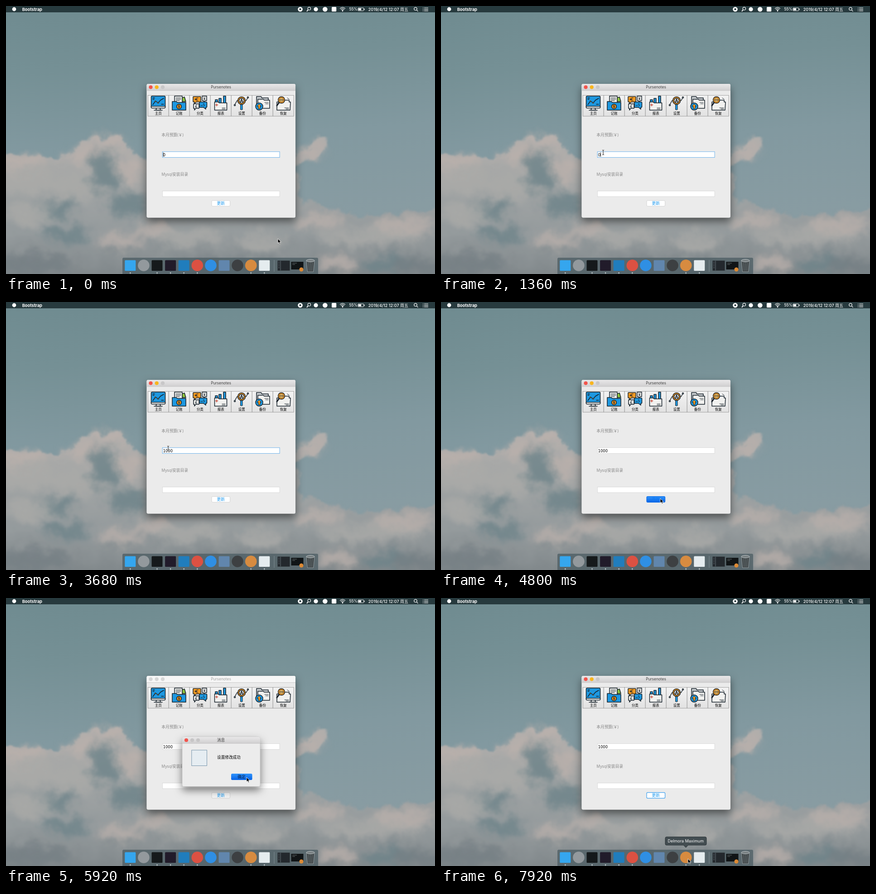
An HTML page that plays this animation: 947x592 px, repeating every 8000 ms.

```html
<!DOCTYPE html>
<html lang="zh">
<head>
<meta charset="utf-8">
<title>Pursenotes</title>
<style>
html, body { margin: 0; width: 100%; height: 100%; overflow: hidden; background: #7b9498; }
svg { position: absolute; left: 0; top: 0; width: 947px; height: 592px; }
text { font-family: Inter, "Noto Sans CJK SC", "Noto Sans CJK", sans-serif; }
.field { font: 8.3px "DejaVu Sans", sans-serif; }
.form { font: 8.7px "Open Sans", "Noto Sans CJK SC", "Noto Sans CJK", sans-serif; fill: #858585; }
.mid { text-anchor: middle; }
.ico { stroke: #17222b; stroke-width: 1.5; stroke-linejoin: round; stroke-linecap: round; fill: none; }
.b { fill: #1e98e0; } .o { fill: #f99c22; } .w { fill: #f1f1ef; } .g { fill: #c9cdd0; }
</style>
</head>
<body>
<svg id="sky" viewBox="0 0 947 592">
  <defs>
    <linearGradient id="air" x1="0" y1="0" x2=".12" y2="1">
      <stop offset="0" stop-color="#6f8b90"/><stop offset=".25" stop-color="#759095"/>
      <stop offset=".55" stop-color="#8299a0"/><stop offset="1" stop-color="#8b9da3"/>
    </linearGradient>
    <linearGradient id="bank" x1="0" y1="285" x2="0" y2="592" gradientUnits="userSpaceOnUse">
      <stop offset="0" stop-color="#b4b0ad"/><stop offset=".35" stop-color="#a2a5a5"/>
      <stop offset=".7" stop-color="#959b9d"/><stop offset="1" stop-color="#82898c"/>
    </linearGradient>
    <filter id="billow" x="-60" y="200" width="1070" height="460" filterUnits="userSpaceOnUse" color-interpolation-filters="sRGB">
      <feTurbulence type="fractalNoise" baseFrequency=".024" numOctaves="5" seed="4" result="n"/>
      <feDisplacementMap in="SourceGraphic" in2="n" scale="46" xChannelSelector="R" yChannelSelector="G"/>
      <feGaussianBlur stdDeviation=".8"/>
    </filter>
    <filter id="soft" x="-60" y="200" width="1070" height="460" filterUnits="userSpaceOnUse" color-interpolation-filters="sRGB"><feGaussianBlur stdDeviation="9"/></filter>
    <filter id="edge" x="-60" y="200" width="1070" height="460" filterUnits="userSpaceOnUse"><feGaussianBlur stdDeviation="2.5"/></filter>
  </defs>
  <rect width="947" height="592" fill="url(#air)"/>
  <g filter="url(#billow)">
    <path filter="url(#edge)" fill="url(#bank)" d="M-50 322C0 318 20 322 45 330C70 345 90 325 118 332C135 330 150 305 180 305C195 300 215 284 240 283C262 284 270 300 275 320C290 322 300 340 325 345L620 345C650 335 680 295 708 290C712 310 695 330 676 336C665 345 655 350 640 352L650 425C700 440 730 462 770 462C820 470 850 450 880 458C910 462 940 438 1000 440V640H-50Z"/>
    <g id="puffs" filter="url(#soft)"></g>
  </g>
</svg>

<svg id="ui" viewBox="0 0 947 592">
  <defs>
    <linearGradient id="bar" x2="0" y2="1"><stop stop-color="#e9e8e9"/><stop offset="1" stop-color="#d0cfd0"/></linearGradient>
    <linearGradient id="key" x2="0" y2="1"><stop stop-color="#f3f3f3"/><stop offset="1" stop-color="#e2e2e2"/></linearGradient>
    <linearGradient id="blue" x2="0" y2="1"><stop stop-color="#2f93fb"/><stop offset="1" stop-color="#0763e6"/></linearGradient>
    <filter id="shade" x="-20%" y="-20%" width="140%" height="150%"><feDropShadow dx="0" dy="8" stdDeviation="9" flood-opacity=".5"/></filter>
  </defs>

  <g id="menubar">
    <rect width="947" height="14" fill="#273a3e"/>
    <g fill="#fff">
      <circle cx="18" cy="7" r="4.4"/>
      <text x="35.7" y="10.5" font-size="9.25" font-weight="700">Bootstrap</text>
      <circle cx="649.5" cy="7.2" r="5.3"/><rect x="647.6" y="5.3" width="3.8" height="3.8" rx=".6" fill="#273a3e"/>
      <circle cx="684" cy="7.2" r="4.6"/>
      <circle cx="704.3" cy="7.2" r="5.3"/>
      <rect x="719" y="2" width="10.2" height="10.2" rx="1.5"/>
      <text x="757.4" y="10.2" font-size="8.3" font-weight="500">55%</text>
      <rect x="778" y="5.2" width="6" height="4.2"/><rect x="790.3" y="5.8" width="1.3" height="3"/>
      <text x="799.8" y="10.5" font-size="9" font-weight="500">2019/4/12 12:07 周五</text>
      <circle cx="743" cy="11" r="1.2"/>
    </g>
    <g fill="none" stroke="#fff" stroke-width="1.2">
      <circle cx="669.3" cy="5.8" r="3.2"/><path d="M667 8.2l-3 3.6" stroke-width="1.8"/>
      <path d="M737 5.6q6-5 12 0M739 7.7q4-3.2 8 0M741 9.6q2-1.4 4 0"/>
      <rect x="777" y="4" width="12.6" height="6.6" rx="1" stroke-width=".9"/>
      <circle cx="904" cy="6.3" r="3.2"/><path d="M906.4 8.7l3 3.2"/>
      <path d="M923 4h9M923 7.3h9M923 10.6h9M920 4h1.4M920 7.3h1.4M920 10.6h1.4"/>
    </g>
  </g>

  <g id="main">
    <rect x="310.5" y="172" width="328.5" height="295.5" rx="3.5" fill="#ebebeb" filter="url(#shade)"/>
    <path id="cap" d="M310.5 186.5V175.5q0-3.5 3.5-3.5H635.5q3.5 0 3.5 3.5V186.5Z" fill="url(#bar)"/>
    <path d="M310.5 186.8H639" stroke="#b9b9b9" stroke-width=".7"/>
    <g id="lights"></g>
    <text id="title" class="mid" x="474.5" y="182.2" font-size="8.4">Pursenotes</text>
    <g id="tools"></g>
    <g class="ico">
      <g id="monitor"><rect class="b" x="320.5" y="199" width="31" height="26" rx="2"/><path class="w" d="M320.5 221.5h31v2q0 2-2 2h-27q-2 0-2-2ZM332 225.5h8l1 4.5h-10Z"/><path d="M327 230.3h18M324 218l6-8 6 4 5-6 7-4M324 203h4M324 206h3M343 217h5"/><path class="o" d="M329 209.5h2v2h-2ZM335 213h2v2h-2Z" stroke-width=".8"/></g>
      <g id="folder"><path fill="#8fc63f" d="M388 203l6-2 3 10h-8Z"/><path class="w" d="M372 199h17v15h-17Z"/><path d="M375 203h11M375 206h11M375 209h8" stroke-width="1.1"/><path class="b" d="M367 211h9l2 2h19v17h-30Z"/><circle class="o" cx="382" cy="222" r="5.3"/><path d="M384 220q-4-2-4 .5t4 2q0 2.5-4 1M382 218.5v7" stroke-width=".9"/></g>
      <g id="chat"><path class="w" d="M433 199h10v10h-3l-3 3-1-3h-3ZM414 216h12v10h-7l-3 4v-4h-2Z"/><path class="o" d="M414 200h15q1 0 1 1v10q0 1-1 1h-9l-4 4v-4h-2q-1 0-1-1v-10q0-1 1-1Z"/><path class="b" d="M427 212h15q1.5 0 1.5 1.5v9q0 1.5-1.5 1.5h-1v4l-5-4h-9Z"/><path d="M424 203q-5-1-5 3t5 3M417 205.5h5M417 207h5M436 201.5l2 2.5 2-2.5M438 204v4M436 205.5h4M422 218.5q-3-1-3 2t-1 3.5h4M418 221.5h3M430 220h4M437 215.5q-4 1 0 2.5t-1 3" stroke-width="1"/></g>
      <g id="chart"><path class="b" d="M462 207h5v9h-5ZM470 204h5v12h-5ZM480 199h5v17h-5Z"/><path class="w" d="M460.5 212h8l2 2h17v16h-27Z"/><path d="M477 225h7M477 227.5h7" stroke-width=".9"/><path d="M465 216v5M462.5 218.5h5" stroke="#c84b3b"/></g>
      <g id="gear"><path d="M505 218l5-9h20l4-7"/><circle class="w" cx="505" cy="219" r="1.5"/><circle class="w" cx="534" cy="202" r="1.5"/><circle class="o" cx="520" cy="209" r="8.5"/><circle class="w" cx="520" cy="209" r="5.5"/><path d="M517 213l3-8 3 8M518 210.5h4"/><path class="b" d="M518 218h4v11h-4Z" stroke-width="1"/></g>
      <g id="backup"><path class="g" d="M553 200h10l2 3h14v20h-26Z"/><path class="w" d="M556 206h12l2 2h12v18h-26Z"/><path d="M571 213h8M573 216h6" stroke-width=".9"/><circle class="b" cx="559" cy="222" r="8"/><path class="o" d="M559 216.5l4.5 5h-2.5v5.5h-4v-5.5h-2.5Z" stroke-width="1"/></g>
      <g id="restore"><path class="w" d="M598 212h10l3-4h14v4h3l-1 18h-29Z"/><path d="M621 203l4 3M615 225h9M618 227.5h6" stroke-width="1"/><path d="M603 213l-5 7" stroke-width="3"/><circle class="o" cx="608" cy="207.5" r="7.3"/><circle cx="608" cy="207.5" r="4.5" fill="#fbc76d" stroke-width=".8"/><path d="M605 207.5h6"/></g>
    </g>
    <text class="form" x="343.3" y="288.4">本月预算(￥)</text>
    <text class="form" x="343.3" y="375.2">Mysql安装目录</text>
    <rect id="budget" x="345.3" y="321.8" width="258.8" height="12.7" fill="#fff"/>
    <rect x="345.3" y="408.8" width="258.8" height="12.2" fill="#fff" stroke="#cfcfcf" stroke-width=".7"/>
    <text id="value" class="field" x="346.8" y="331.5"></text>
    <rect id="caret" y="323.5" width=".9" height="9.5"/>
    <rect id="save" x="454" y="429.7" width="40.6" height="12.6" rx="2.3"/>
    <text id="saveText" class="mid" x="474.2" y="439" font-size="8.7">更新</text>
  </g>

  <g id="dialog">
    <rect x="389" y="307" width="172" height="109.5" rx="3.5" fill="#ececec" stroke="#a9a9a9" stroke-width=".5" filter="url(#shade)"/>
    <path d="M389 321V310.5q0-3.5 3.5-3.5H557.5q3.5 0 3.5 3.5V321Z" fill="url(#bar)"/>
    <path d="M389 321.2H561" stroke="#b5b5b5" stroke-width=".7"/>
    <circle cx="398" cy="314" r="4.1" fill="#f2544c"/><circle cx="411" cy="314" r="4.1" fill="#c6c5c6"/><circle cx="424" cy="314" r="4.1" fill="#c6c5c6"/>
    <text class="mid" x="474.5" y="317.2" font-size="8.7" fill="#3c3c3c">消息</text>
    <rect x="409.8" y="336" width="33.6" height="34.5" fill="#e6edf2" stroke="#6a8ba4" stroke-width=".9"/>
    <text x="466" y="355.2" font-size="8.65">设置修改成功</text>
    <rect x="497" y="388" width="46.5" height="14" rx="2.5" fill="url(#blue)"/>
    <text class="mid" x="520" y="398.2" font-size="8.7" fill="#06224d">确定</text>
  </g>

  <g id="dock">
    <path d="M257 592V559q0-3 3-3H686q3 0 3 3V592Z" fill="#4f5f66" fill-opacity=".8"/>
    <path d="M592 561V587" stroke="#8c989d" stroke-width=".8"/>
    <rect x="599.5" y="562.5" width="27" height="22" fill="#23282d"/><path d="M601 566h3M601 570h3M601 574h3M601 578h3M606 563v21" stroke="#69737a"/>
    <rect x="629.5" y="565" width="27" height="17" fill="#101416"/><path d="M632 568h10M632 571h6" stroke="#8d9599" stroke-width=".7"/>
    <circle cx="652" cy="582" r="4.5" fill="#dc8a35"/>
    <path d="M663 562h18l-2.5 25h-13Z" fill="#42494b" stroke="#a2aaad" stroke-width=".8"/><ellipse cx="672" cy="562.5" rx="9" ry="2.8" fill="#777f81" stroke="#c2c8ca"/>
    <path d="M668 567l1 18M672 567v18M676 567l-1 18" stroke="#70787a" stroke-width=".8"/>
  </g>

  <g id="tip">
    <path d="M498 527.7H583q3 0 3 3V543q0 3-3 3H545.5l-5 5.2-5-5.2H498q-3 0-3-3V530.7q0-3 3-3Z" fill="#434d51" stroke="#20282b" stroke-width=".8"/>
    <text class="mid" x="540.3" y="540" font-size="9" fill="#fff">Delmora Maximum</text>
  </g>

  <path id="arrow" d="M0 0V10L2.3 7.9 4 11.5 5.7 10.7 4.1 7.3H7.2Z" stroke="#fff" stroke-width=".8"/>
  <g id="beam" fill="none">
    <path d="M-2-5.5Q0-5 0-4Q0-5 2-5.5M0-4V4M-2 5.5Q0 5 0 4Q0 5 2 5.5" stroke="#fff" stroke-width="2" opacity=".7"/>
    <path d="M-2-5.5Q0-5 0-4Q0-5 2-5.5M0-4V4M-2 5.5Q0 5 0 4Q0 5 2 5.5" stroke="#111" stroke-width="1"/>
  </g>
</svg>

<script>
const $ = id => document.getElementById(id);
const add = (parent, tag, attrs, text) => {
  const el = document.createElementNS('http://www.w3.org/2000/svg', tag);
  for (const k in attrs) el.setAttribute(k, attrs[k]);
  if (text) el.textContent = text;
  return parent.appendChild(el);
};
const set = (id, attrs) => { for (const k in attrs) $(id).setAttribute(k, attrs[k]); };
const show = (id, on) => $(id).style.display = on ? '' : 'none';

// cloud shade and light: colour, then x y rx ry of each puff
const puffs = {
  '#6c8389': [218, 368, 32, 46, 270, 440, 50, 25, 110, 450, 50, 16, 130, 505, 55, 16, 840, 570, 60, 16],
  '#757f84': [60, 570, 90, 22, 490, 580, 130, 14, 910, 575, 60, 18],
  '#aaaaa8': [50, 385, 70, 30, 150, 400, 45, 30, 50, 460, 50, 20, 400, 510, 80, 20, 560, 520, 60, 20, 800, 510, 120, 18],
  '#bbb1ac': [235, 300, 36, 14, 165, 330, 36, 18, 30, 345, 60, 18, 272, 365, 22, 34, 675, 322, 26, 14,
    690, 475, 55, 15, 880, 485, 70, 18, 250, 518, 50, 16, 320, 495, 40, 14, 735, 568, 40, 18]
};
for (const fill in puffs)
  for (let i = 0, p = puffs[fill]; i < p.length; i += 4)
    add($('puffs'), 'ellipse', { cx: p[i], cy: p[i + 1], rx: p[i + 2], ry: p[i + 3], fill, opacity: .8 });

['主页', '记账', '分类', '报表', '设置', '备份', '恢复'].forEach((name, i) => {
  const x = 313.2 + 46 * i;
  add($('tools'), 'rect', { x, y: 197.3, width: 46, height: 46, fill: 'url(#key)', stroke: '#909090', 'stroke-width': .8 });
  add($('tools'), 'text', { x: x + 23, y: 240.4, class: 'mid', 'font-size': 7.5, 'font-weight': 500 }, name);
});

const lights = [319.5, 332.7, 346].map(cx => add($('lights'), 'circle', { cx, cy: 179.3, r: 4.1 }));

// dock icons: shape, colour, running
[['s', '#35a6ee', 1], ['c', '#93999d', 0], ['s', '#15191b', 1], ['s', '#211b2a', 1], ['s', '#207dbd', 1], ['c', '#dc5142', 1],
 ['c', '#2f8fe4', 0], ['s', '#6186ad', 0], ['c', '#3d4042', 0], ['c', '#d78b40', 1], ['s', '#e5ecef', 1]
].forEach(([shape, fill, runs], i) => {
  const x = 274.3 + 29.6 * i;
  if (shape === 'c') add($('dock'), 'circle', { cx: x, cy: 573, r: 12.8, fill });
  else add($('dock'), 'rect', { x: x - 12, y: 561.5, width: 24, height: 23.5, rx: 1.5, fill });
  if (runs) add($('dock'), 'circle', { cx: x, cy: 589.6, r: 1.2, fill: '#e8eef0' });
});

const LOOP = 8000, STEP = 80;
// pointer stops: time, x, y
const path = [[0, 600, 514], [240, 600, 514], [1120, 358, 323.5], [3760, 358, 323.5], [4560, 484, 434], [5120, 484, 434],
  [5680, 531, 396], [6080, 531, 396], [6560, 527, 575], [6720, 527, 575], [7200, 545, 576], [LOOP, 545, 576]];
const typed = [[0, '0'], [2000, ''], [2400, '1'], [2720, '10'], [2880, '100'], [3040, '1000']];
const CLICK = 1280, PRESS = 4720, OPEN = 5040, CLOSE = 6080;

function pointer(t) {
  const i = path.findIndex(p => p[0] > t), [t0, x0, y0] = path[i - 1], [t1, x1, y1] = path[i];
  const u = (t - t0) / (t1 - t0), e = u * u * (3 - 2 * u);
  return [x0 + (x1 - x0) * e, y0 + (y1 - y0) * e];
}

function draw(t) {
  const [x, y] = pointer(t);
  const open = t >= OPEN && t < CLOSE, down = t >= PRESS && t < OPEN - STEP;
  const focus = t < PRESS, ring = t >= PRESS && !open;
  const text = typed.filter(k => k[0] <= t).pop()[1];

  $('value').textContent = text;
  show('caret', focus && t % 1000 < 500);
  set('caret', { x: 346.8 + (t < CLICK ? 0 : text.length * 5.28) });
  set('budget', { stroke: focus ? '#6fb2ea' : '#cfcfcf', 'stroke-width': focus ? 1 : .7 });

  set('save', {
    fill: down ? 'url(#blue)' : open ? '#f4f4f4' : '#fff',
    stroke: down ? '#0f6fe8' : ring ? '#3fa0ee' : '#c6c6c6',
    'stroke-width': ring ? 1.2 : .7
  });
  set('saveText', { fill: down ? '#1179f2' : '#1596ee' });

  set('cap', { fill: open ? '#f6f6f6' : 'url(#bar)' });
  set('title', { fill: open ? '#a3a3a3' : '#404040' });
  lights.forEach((c, i) => c.setAttribute('fill', open ? '#d6d6d6' : ['#f2544c', '#f8b51c', '#c8c7c8'][i]));
  show('dialog', open);

  show('tip', y > 556 && x > 525.5 && x < 555);
  const inField = !open && x > 345 && x < 604 && (y > 321.8 && y < 334.5 || y > 408.8 && y < 421);
  show('beam', inField);
  show('arrow', !inField);
  set(inField ? 'beam' : 'arrow', { transform: `translate(${x} ${y})` });
}

const start = performance.now();
let last = -1;
function tick() {
  const t = Math.floor((performance.now() - start) % LOOP / STEP) * STEP;
  if (t !== last) draw(last = t);
  requestAnimationFrame(tick);
}
tick();
</script>
</body>
</html>
```
